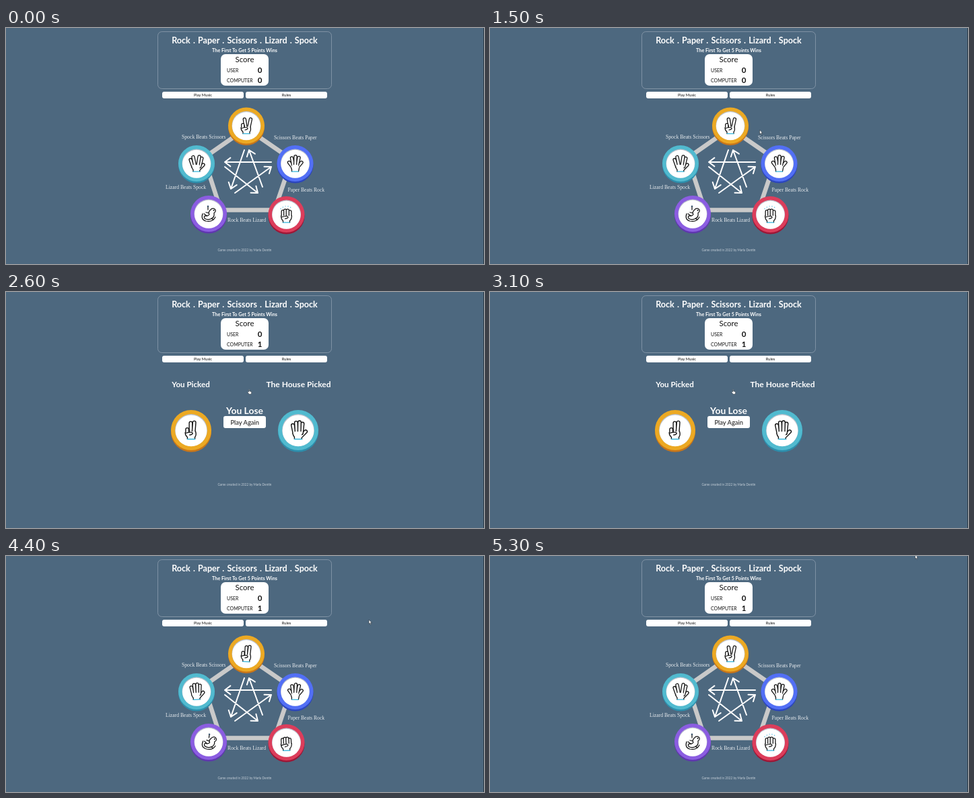
An HTML page that plays this animation: 710 by 352 pixels, repeating every 5400 ms.

```html
<!DOCTYPE html>
<html lang="en">
<head>
<meta charset="utf-8">
<title>Rock Paper Scissors Lizard Spock</title>
<style>
  html, body { margin: 0; width: 100%; height: 100%; overflow: hidden; background: #4d687f; }
  svg { display: block; width: 710px; height: 352px; }
  text { font-family: Lato, "Open Sans", sans-serif; fill: #fff; text-anchor: middle; }
  .b { font-weight: 700; }
  .k { fill: #111; }
  .left { text-anchor: start; }
  .rule { font: 7.7px "Liberation Serif", serif; fill: #e6eaed; text-anchor: start; }
  .foot { font-size: 4.7px; fill: #c3cdd6; }
  .bars { stroke: #c9c9c9; stroke-width: 6.5; fill: none; }
  .star { stroke: #fff; stroke-width: 2; fill: none; stroke-linecap: round; stroke-linejoin: round; }
  .icon { fill: none; stroke-linecap: round; stroke-linejoin: round; }
  .edge { stroke: #111; stroke-width: 5.4; }
  .fill { stroke: #fff; stroke-width: 2.9; }
  .line { stroke: #111; stroke-width: 1.25; }
  .skin { fill: #fff; }
  .cuff { stroke: #35b5dc; stroke-width: 1.3; }
  .cursor { fill: #fff; stroke: #26323c; stroke-width: .6; stroke-linejoin: round; }
</style>
</head>
<body>
<svg id="stage" viewBox="0 0 710 352"></svg>
<script>
const LOOP = 5400, STEP = 100, PICK = 2200, AGAIN = 4200;

// keys: [time, ...values], eased between neighbours
const TILT = [[0, 0], [300, 0], [700, 1], [1000, .8], [1400, 0], [3400, 0], [3900, 1], [4100, 1], [4400, .25], [4700, 0]];
const OPEN = [[0, 1], [300, 0], [1200, 0], [1500, 1], [2100, 1], [2500, 0], [4700, 0], [5000, 1]];
const HOVER = [[3600, 0], [4150, 1]];
const MOUSE = [[200, 566, 358], [600, 571.5, 165], [1200, 571.5, 165], [1500, 400.5, 152], [1700, 359.5, 145],
  [3400, 359.5, 145], [3700, 365, 192], [4200, 365, 192], [4400, 539, 95], [4700, 539, 95], [5100, 631.5, -2]];

function at(keys, t) {
  const i = keys.findIndex(k => k[0] > t);
  if (i === 0) return keys[0].slice(1);
  if (i < 0) return keys[keys.length - 1].slice(1);
  const a = keys[i - 1], b = keys[i];
  const p = (t - a[0]) / (b[0] - a[0]), e = p * p * (3 - 2 * p);
  return a.slice(1).map((v, n) => v + (b[n + 1] - v) * e);
}

const label = (x, y, size, str, cls = 'b') => `<text x="${x}" y="${y}" font-size="${size}" class="${cls}">${str}</text>`;
const rule = (x, y, str) => `<text x="${x}" y="${y}" class="rule">${str}</text>`;
const box = (x, y, w, h, r, more = 'fill="#fff"') => `<rect x="${x}" y="${y}" width="${w}" height="${h}" rx="${r}" ${more}/>`;
const path = (cls, d) => `<path class="${cls}" d="${d}"/>`;
const line = d => path('line', d);
const footer = y => label(354.5, y, 4.7, 'Game created in 2022 by Marla Dentin', 'foot');

function finger(x, y, u, v) {
  const d = `M${x} ${y}L${u} ${v}`;
  return path('edge', d) + path('fill', d);
}
// the two sides are outlined, the top stays open towards the fingers
const palm = (left, right) => path('skin', `M${left}L-4.5 2H4.5L${right}Z`) + line(`M${left}M${right}`)
  + path('cuff', 'M-5 12.2H5');
const fan = (side, parts) => `<g class="fan${side}">${parts}</g>`;

const icons = {
  scissors: fan('L', finger(-.5, 2, -.5, -9.5)) + fan('R', finger(3.3, 2, 4.2, -10.2))
    + finger(-5.2, 4, -5.2, -1)
    + palm('-5 12V9.5Q-8 7 -7.9 3', '6 2Q7.3 7 5 9.5V12')
    + line('M-7 4Q1 1.5 2 4Q2 6 -2 6.5M-2.8 3V0'),
  paper: finger(-4, 5, -9, -1.5) + finger(4, 5, 9.5, -1.5) + finger(-3, 3, -5, -8)
    + finger(3, 3, 5.5, -8.5) + finger(0, 3, .5, -10.3)
    + palm('-5 12V9Q-5.5 8 -6 6.5', '6 6.8Q5.5 9 5 12'),
  spock: finger(3, 9, 10, 2)
    + fan('L', finger(-5, 4, -7.2, -6.5) + finger(-2, 4, -2.8, -10))
    + fan('R', finger(4.5, 4, 5.8, -8.5) + finger(1.5, 4, 1.8, -10.5))
    + palm('-5 12V9.5Q-7 7 -7.4 4', '4.6 10.6L5 12'),
  rock: finger(-5.3, 2, -5.3, -4.3) + finger(5.3, 2, 5.3, -4) + finger(-1.8, 2, -1.8, -5.7) + finger(1.8, 2, 1.8, -5.7)
    + palm('-5 12V9.5Q-8 7 -7.9 2', '7.9 2Q8 7 5 9.5V12')
    + line('M-7 4Q2 1 2.5 4Q2.5 6 -2 6.5')
    + '<path class="cuff sparks" stroke-dasharray="0 4" d="M-8.5 -8.5Q0 -16 9 -8.5"/>',
  lizard: path('line skin', 'M2 -5Q5 -9.5 9 -7Q12 -4 8 -1Q9 5 4 7.5Q-2 10 -6 7Q-8 3 -4 3Q-1 4 1 1Q-1 -2 2 -5Z')
    + line('M-9 0Q-12 9 -4 11Q6 13 10 5M0 -1L-4 -2M-3 3L-7 0M4 7L7 9M-1 -10V-6')
    + '<circle cx="7.5" cy="-5" r="1" fill="#111"/><circle cx="-1" cy="-11" r="1.3" fill="#3d5870"/>'
};

const badges = {
  scissors: ['#eca923', '#c8761a', 11],
  paper: ['#526ff5', '#2c46bd', 6],
  rock: ['#dc3d5b', '#9d1737', -10],
  lizard: ['#8b5de1', '#5f37ae', 28],
  spock: ['#51bacf', '#2d8eac', -12]
};

function badge(name, x, y, r = 27) {
  const [color, dark, lean] = badges[name];
  return `<g transform="translate(${x} ${y}) scale(${r / 27})">
    <circle cy="2.5" r="27" fill="${dark}"/><circle r="27" fill="${color}"/>
    <circle r="21.5" fill="#bcc2cd"/><circle cy=".8" r="21" fill="#fff"/>
    <g class="icon" data-lean="${lean}">${icons[name]}</g></g>`;
}

// arrow from (x, y) to (u, v)
function arrow(x, y, u, v) {
  const a = Math.atan2(v - y, u - x);
  const wing = s => `${u - 10.5 * Math.cos(a + s)} ${v - 10.5 * Math.sin(a + s)}`;
  return `M${x} ${y}L${u} ${v}M${wing(.65)}L${u} ${v}L${wing(-.65)}`;
}

const header = box(225.5, 5.5, 258, 85, 6, 'fill="none" stroke="#8c9eae" stroke-width=".8"')
  + `<g word-spacing="1">${label(354.5, 23, 12.6, 'Rock . Paper . Scissors . Lizard . Spock')}</g>`
  + label(354.5, 36, 7.2, 'The First To Get 5 Points Wins')
  + box(319, 39, 71, 47, 7)
  + label(354.5, 50.5, 11.4, 'Score', 'k')
  + label(328, 65.5, 7, 'USER', 'k left') + label(328, 80.5, 7, 'COMPUTER', 'k left')
  + label(377, 67, 11.5, '0', 'b k') + '<text id="points" x="377" y="82" font-size="11.5" class="b k"></text>'
  + box(232, 95, 121, 10, 3) + box(356, 95, 121, 10, 3)
  + label(292.5, 102, 5.8, 'Play Music', 'k') + label(416.5, 102, 5.8, 'Rules', 'k');

const board = path('bars', 'M282 202L357 149.5L430 200M296 200L319 271.5H399L422 203')
  + path('star', arrow(394, 200, 325, 200) + arrow(381, 237, 361, 182) + arrow(354, 182, 334, 240)
    + arrow(340, 246, 394, 207) + arrow(325, 207, 374, 246))
  + badge('scissors', 357, 145.5) + badge('paper', 429.5, 202) + badge('spock', 283, 202)
  + badge('lizard', 301, 277) + badge('rock', 416.5, 278)
  + rule(261, 164.5, 'Spock Beats Scissors') + rule(398, 166, 'Scissors Beats Paper')
  + rule(237, 240, 'Lizard Beats Spock') + rule(418.5, 243.5, 'Paper Beats Rock')
  + rule(329, 289, 'Rock Beats Lizard') + footer(333.3);

const result = label(274.5, 142, 11.6, 'You Picked') + label(434.5, 142, 12, 'The House Picked')
  + label(354.5, 181.5, 13.9, 'You Lose')
  + box(323, 185, 63, 18, 3, 'id="wipe" fill="#fff"')
  + '<text id="again" x="354.7" y="197.5" font-size="9.4">Play Again</text>'
  + badge('scissors', 275, 206, 30) + badge('spock', 434, 206, 30) + footer(289.3);

const stage = document.getElementById('stage');
stage.innerHTML = '<rect width="710" height="352" fill="#4d687f"/><rect x="709" width="1" height="352" fill="#2b3a47"/>'
  + `${header}<g id="board">${board}</g><g id="result">${result}</g>
  <g id="mouse"><path id="arrow" class="cursor" d="M0 0V6.3L1.4 5L2.4 7.3L3.4 6.8L2.4 4.6H4.3Z"/>
  <path id="hand" class="cursor" d="M1 4V.8Q1.6 -.2 2.2 .8V3L5 3.6Q5.6 5.6 4.6 7.4H1.6L-.6 4.6Q0 3.4 1 4Z"/></g>`;

const $ = id => document.getElementById(id);
const all = q => [...stage.querySelectorAll(q)];
const show = (el, on) => el.setAttribute('visibility', on ? 'visible' : 'hidden');
const turn = (el, deg) => el.setAttribute('transform', `rotate(${deg} 0 6)`);
const art = all('.icon'), fanL = all('.fanL'), fanR = all('.fanR'), sparks = all('.sparks');

function draw() {
  const t = Math.floor(performance.now() % LOOP / STEP) * STEP;
  const picked = t >= PICK && t < AGAIN;
  show($('board'), !picked);
  show($('result'), picked);
  $('points').textContent = t >= PICK ? 1 : 0;

  const [tilt] = at(TILT, t), [open] = at(OPEN, t), [hover] = at(HOVER, t);
  art.forEach(el => turn(el, el.dataset.lean * tilt));
  fanL.forEach(el => turn(el, -8 * open));
  fanR.forEach(el => turn(el, 8 * open));
  sparks.forEach(el => el.setAttribute('opacity', open));

  $('wipe').setAttribute('x', 323 + 63 * hover);
  $('wipe').setAttribute('width', 63 * (1 - hover));
  const g = Math.round(17 + 238 * hover);
  $('again').style.fill = `rgb(${g},${g},${g})`;

  const over = t >= 1600 && t < AGAIN;
  $('mouse').setAttribute('transform', `translate(${at(MOUSE, t)})`);
  show($('hand'), over);
  show($('arrow'), !over);
  requestAnimationFrame(draw);
}
draw();
</script>
</body>
</html>
```
